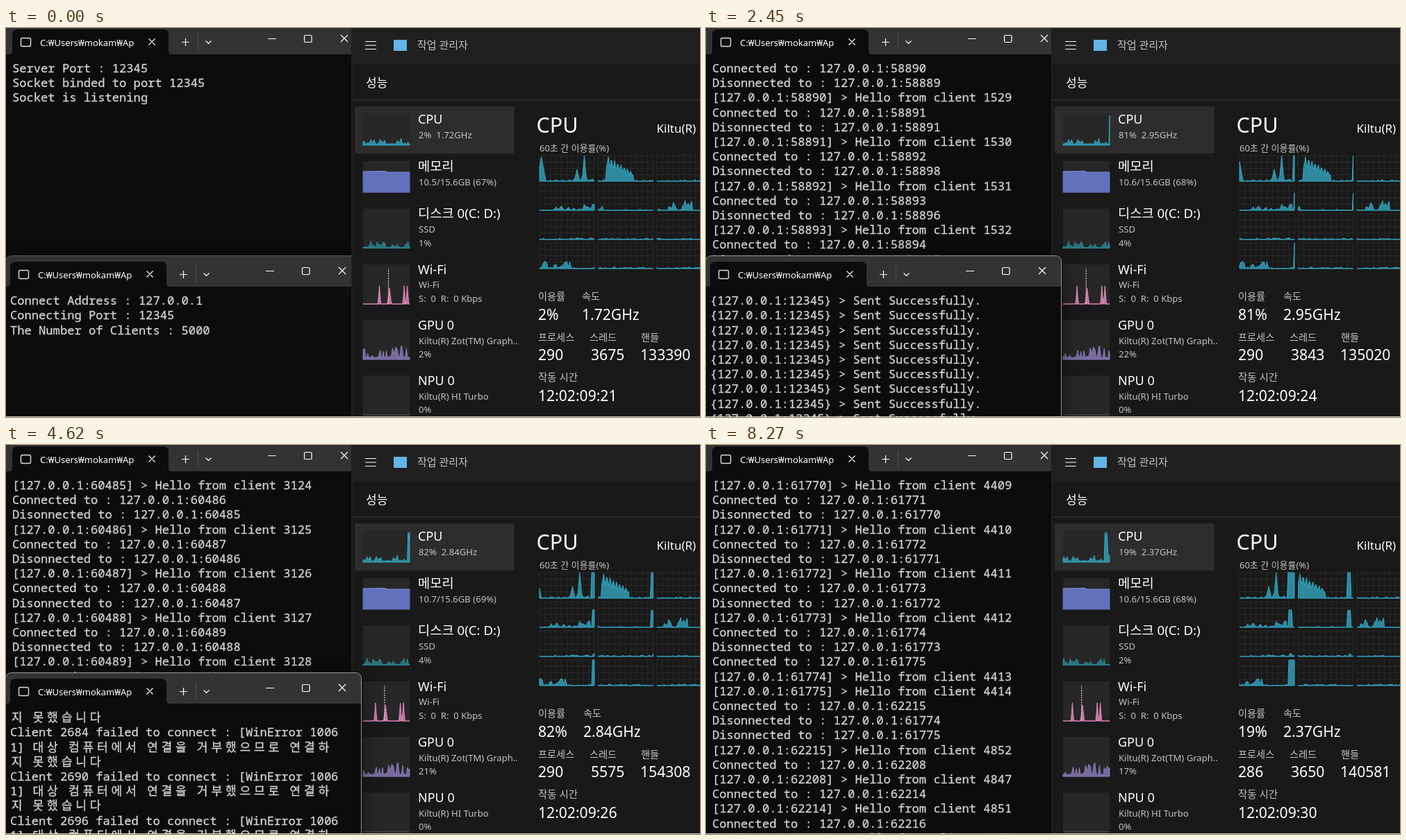
An HTML page that plays this animation: 999x561 px, repeating every 8300 ms.

```html
<!DOCTYPE html>
<html lang="ko">
<head>
<meta charset="utf-8">
<title>Socket load test</title>
<style>
html, body { margin: 0; width: 100%; height: 100%; overflow: hidden; background: #0c0c0c; }
svg { display: block; width: 100%; height: 100%; }
text { font-family: "Noto Sans", "Noto Sans CJK KR", sans-serif; fill: #fff; white-space: pre; }
.mono { font: 17.1px "Noto Sans Mono", "Noto Sans Mono CJK KR", "Noto Sans CJK KR", monospace; fill: #d4d4d4; stroke: #d4d4d4; stroke-width: .3; }
.line { fill: none; stroke: #fff; stroke-width: 1.2; }
.dim { fill: #c4c4c4; }
.thin { font-weight: 300; }
</style>
</head>
<body>
<svg id="stage" viewBox="0 0 999 561"></svg>
<script>
const LOOP = 8300, START = 1140, END = 5340, TICK = 36;
const CELL = 10.27, ROW = 21.2, HOST = '127.0.0.1';
const stage = document.getElementById('stage');

function add(parent, tag, attrs, text) {
  const node = document.createElementNS('http://www.w3.org/2000/svg', tag);
  for (const key in attrs) node.setAttribute(key, attrs[key]);
  if (text) node.textContent = text;
  parent.appendChild(node);
  return node;
}
const rect = (parent, x, y, width, height, fill, more) =>
  add(parent, 'rect', { x, y, width, height, fill, ...more });
const label = (x, y, size, text, more) =>
  add(stage, 'text', { x, y, 'font-size': size, ...more }, text);
const clamp = v => Math.max(0, Math.min(1, v));
const rand = (a, b) => { const v = Math.sin(a * 12.9898 + b * 78.233) * 43758.5453; return v - Math.floor(v); };

// Linear interpolation through [time, value] key points.
function track(t, ...keys) {
  let i = 1;
  while (i < keys.length - 1 && t > keys[i][0]) i++;
  const [t0, a] = keys[i - 1], [t1, b] = keys[i];
  return a + (b - a) * clamp((t - t0) / (t1 - t0));
}

// ---- terminals ----
const clips = add(stage, 'defs', {});
rect(add(clips, 'clipPath', { id: 'tabClip' }), 49, 0, 140, 40, '#000');

function chrome(parent, dx, dy) {
  const g = add(parent, 'g', { transform: `translate(${dx} ${dy})` });
  add(g, 'path', { d: 'M5 38Q9 38 9 33V10Q9 2 17 2H226Q234 2 234 10V33Q234 38 238 38Z', fill: '#0c0c0c' });
  rect(g, 21.5, 14.5, 14, 12, '#0c0c0c', { rx: 2, stroke: '#ddd', 'stroke-width': 1.4 });
  add(g, 'text', { x: 49, y: 25.5, 'font-size': 13, 'font-weight': 500, 'clip-path': 'url(#tabClip)' }, 'C:₩Users₩mokam₩Ap');
  add(g, 'path', { class: 'line', d: 'M205.5 15.5l9 9m0-9l-9 9M253 20.5h11m-5.5-5.5v11M287.5 18.5l4 4 4-4' });
  add(g, 'path', { class: 'line', d: 'M276.5 8v24', style: 'stroke:#4c4c4c' });
  add(g, 'path', { class: 'line', d: 'M377 15.5h12M482 10l10 10m0-10l-10 10' });
  rect(g, 429.5, 10.5, 10.5, 10, 'none', { class: 'line', rx: 1.5 });
}

const wide = ch => ch.charCodeAt(0) > 0x1100 ? 2 : 1;

function screen(parent, x, y, count) {
  const rows = Array.from({ length: count }, (_, i) =>
    add(parent, 'text', { class: 'mono', y: y + i * ROW }));
  return lines => rows.forEach((row, i) => {
    const s = lines[i] || '';
    if (row.textContent === s) return;
    let col = 0;
    row.setAttribute('x', [...s].map(ch => {
      const at = x + col * CELL + (wide(ch) - 1) * 1.8;
      col += wide(ch);
      return at.toFixed(1);
    }).join(' '));
    row.textContent = s;
  });
}

const opened = port => `Connected to : ${HOST}:${port}`;
const closed = port => `Disonnected to : ${HOST}:${port}`;
const hello = (port, id = port - (port < 58500 ? 57352 : 57361)) =>
  `[${HOST}:${port}] > Hello from client ${id}`;

const serverIntro = ['Server Port : 12345', 'Socket binded to port 12345', 'Socket is listening'];
const clientIntro = [`Connect Address : ${HOST}`, 'Connecting Port : 12345', 'The Number of Clients : 5000'];
const sent = `{${HOST}:12345} > Sent Successfully.`;

// Log lines for consecutive ports; `order` turns a port into its lines.
function feed(port, count, order) {
  const out = [];
  while (out.length < count) out.push(...order(port++));
  return out;
}
const alternating = port => port % 2
  ? [opened(port), closed(port - 1), hello(port)]
  : [opened(port), hello(port), closed(port - 1)];
const jumbled = port => [opened(port), closed(port - 2 + Math.floor(rand(port, 2) * 10)), hello(port)];
const pairs = port => [opened(port), hello(port)];
const steady = port => [opened(port), closed(port - 1), hello(port)];

const lastLog = [
  ...feed(61770, 12, steady).slice(2), opened(61774), closed(61773), opened(61775),
  hello(61774), hello(61775), opened(62215), closed(61774), closed(61775), hello(62215, 4852),
  opened(62208), hello(62208), opened(62214), hello(62214, 4851), opened(62216), hello(62216, 4853)
];

function serverLines(t, tick) {
  if (t < START) return serverIntro;
  if (t >= END) return lastLog;
  if (tick < 1) return [...serverIntro, ...feed(57353, 12, alternating)];
  if (t < 3840) {
    const port = Math.round(track(t, [START, 57352], [1464, 57928], [2436, 58890], [3804, 61926]));
    if (t > 2900) return feed(port, 25, pairs).slice(tick % 2);
    return feed(port, 25, t < 2200 ? alternating : jumbled).slice(tick % 3);
  }
  const port = Math.round(track(t, [3840, 59100], [4596, 60485], [END, 61770]));
  return feed(port, 25, steady).slice((tick + 2) % 3);
}

function wrap(text) {
  const lines = [''];
  let used = 0;
  for (const ch of text) {
    if (used + wide(ch) > 46) { lines.push(''); used = 0; }
    lines[lines.length - 1] += ch;
    used += wide(ch);
  }
  return lines;
}
const refused = id =>
  wrap(`Client ${id} failed to connect : [WinError 10061] 대상 컴퓨터에서 연결을 거부했으므로 연결하지 못했습니다`);

function clientLines(t, tick) {
  if (t < START) return clientIntro;
  if (t < 2850) return [...(tick < 1 ? clientIntro : []), ...Array(9).fill(sent)];
  const id = Math.round(track(t, [2850, 60], [3804, 1224], [4596, 2678], [END, 4150]));
  return [0, 1, 2, 3].flatMap(i => refused(id + i * 6)).slice((2 * tick + 2) % 3);
}

rect(stage, 0, 0, 999, 561, '#0c0c0c');
rect(stage, 0, 0, 498, 38, '#333');
chrome(stage, 0, 0);
const showServer = screen(stage, 9, 64, 25);

// ---- task manager ----
rect(stage, 497, 0, 502, 561, '#202020');
add(stage, 'path', { d: 'M499 561V58Q499 52 505 52H999V561Z', fill: '#191919' });
rect(stage, 499, 103, 500, 1.5, '#2e2e2e');
rect(stage, 502, 113, 230, 68, '#2d2d2d', { rx: 3 });
add(stage, 'path', { class: 'line', d: 'M517 19.5h16m-16 5.5h16m-16 5.5h16' });
rect(stage, 558, 17, 19, 16, '#62b5e5');
label(592, 30, 15, '작업 관리자', { class: 'dim' });
label(518, 85, 17, '성능', { 'font-weight': 500 });

// Usage in percent, n refreshes into the run.
const usage = n => Math.round(track(n, [0, 2], [1, 4], [2, 23], [3, 81], [4, 63], [5, 82], [6, 74], [7, 21], [9, 19]));

// A level is a function of the sample number; 0 is the newest sample at the start.
const ripple = (seed, top, from = -60, to = 60) => i => {
  if (i < from || i > to) return 0;
  const k = Math.floor(i / 2), mid = (rand(k, seed) + rand(Math.ceil(i / 2), seed)) / 2;
  return top * mid * mid;
};
const spike = (at, top, half = 2) => i => top * (1 - Math.abs(i - at) / half);
const busy = (from, to, top) => i => i >= from && i <= to ? top : 0;
const burst = (from, to) => i => i < from || i > to ? 0
  : (1 - 0.65 * (i - from) / (to - from)) * (0.78 + 0.22 * Math.cos(1.8 * (i - from - 2)));

function chart(x, y, w, h, color, ...levels) {
  const path = add(stage, 'path', { fill: color, 'fill-opacity': 0.75, stroke: color, 'stroke-width': 0.9 });
  return shift => {
    let d = `M${x} ${y + h}`;
    for (let k = 0; k <= 60; k++) {
      const level = clamp(Math.max(...levels.map(f => f(shift - 60 + k))));
      d += `L${(x + k * w / 60).toFixed(1)} ${(y + h - h * level).toFixed(1)}`;
    }
    path.setAttribute('d', d + `V${y + h}Z`);
  };
}

const cyan = '#35aecb', teal = '#2c8c9b', pink = '#ee8fc6', violet = '#9180c4';
rect(stage, 514, 123, 67, 46, '#272727');
rect(stage, 514, 192, 67, 45, '#272727');
for (let i = 0; i < 4; i++) rect(stage, 514, 260.5 + i * 80.3, 67, 57.5, '#272727');
add(stage, 'path', { d: 'M513.5 207L545 206.5L548 208H581.5V237.5H513.5Z', fill: '#6171bb' });
add(stage, 'path', { class: 'line', d: 'M514 207L545 206.500L548 208H581', style: 'stroke:#8090dc' });
rect(stage, 514, 557.5, 67, 1, '#555');

const charts = [
  chart(514, 123, 67, 46, cyan, ripple(3, 0.18), spike(-11, 0.22), () => 0.04,
    i => i > 2 ? Math.min(0.97, usage(i) / 100 * 1.15) : 0),
  chart(514, 260, 67, 57.5, teal, ripple(8, 0.17), spike(-50, 0.18), () => 0.02),
  chart(514, 341, 67, 57, pink, ...[-39, -7, -3].map(at => spike(at, 0.46, 1.7)), spike(-26, 0.4, 2.5)),
  chart(514, 421, 67, 57, violet, ripple(5, 0.36), spike(-11, 0.33), () => 0.05, i => i > 1 ? 0.17 + 0.1 * rand(i, 4) : 0)
];
const dotted = add(stage, 'path', { class: 'line', 'stroke-dasharray': '2 1.5', style: 'stroke:#ffc4e4' });

const cores = {
  0: [spike(-58, 0.95, 5), spike(-19, 0.46, 3), spike(-11, 1, 2.5), ripple(2, 0.2, -24, 0), busy(2, 9, 1)],
  1: [burst(-51, -22), busy(3, 6, 1)],
  3: [ripple(6, 0.25, -45, 0), spike(-11, 0.24), busy(3, 6, 0.68)],
  4: [spike(-56, 0.17), busy(3, 6, 0.66)],
  5: [ripple(9, 0.4, -47, -22), spike(-29, 0.38)],
  6: [busy(4, 6, 0.11)],
  7: [busy(5, 6, 0.11)],
  9: [ripple(11, 0.4, -58, -25), spike(-27, 0.26), busy(3, 9, 1)]
};
for (let n = 0; n < 12; n++) {
  const x = 768 + n % 3 * 84.5, y = 184 + Math.floor(n / 3) * 42, w = 79, h = 37;
  let d = `M${x} ${y}h${w}v${h}h${-w}Z`;
  for (let k = 1; k < 10; k++) d += `M${x + k * w / 10} ${y}v${h}`;
  for (let k = 1; k < 4; k++) d += `M${x} ${y + k * h / 4}h${w}`;
  add(stage, 'path', { class: 'line', d, style: 'stroke:#2a2a2a;stroke-width:1' });
  charts.push(chart(x, y, w, h, cyan, ripple(n + 20, 0.06), ...(cores[n] || [])));
}

['CPU', '메모리', '디스크 0(C: D:)', 'Wi-Fi', 'GPU 0', 'NPU 0'].forEach((text, i) =>
  label(593, i < 3 ? 138 + i * 68.2 : 355 + (i - 3) * 80.2, /[가-힣]/.test(text) ? 18.7 : 18, text));
const note = (y, text) => label(594, y, 13.1, text, { class: 'dim' });
const cpuNote = note(159), memNote = note(227);
note(295, 'SSD');
const diskNote = note(314.5);
note(375, 'Wi-Fi');
note(395, 'S:\u00a0 0\u00a0 R:\u00a0 0 Kbps');
note(456, 'Kiltu(R) Zot(TM) Graph..');
const gpuNote = note(475);
note(536, 'Kiltu(R) HI Turbo');
note(555, '0%');

label(763.5, 150.5, 30.5, 'CPU', { class: 'thin' });
label(936.5, 151, 17, 'Kiltu(R)');
const dim = (x, y, size, text) => label(x, y, size, text, { class: 'dim' });
dim(768, 178, 13, '60초 간 이용률(%)');
dim(766, 392, 14.2, '이용률');
const speedLabel = dim(829, 392, 14.2, '속도');
['프로세스', '스레드', '핸들'].forEach((text, i) => dim(766 + i * 74, 451, 14.2, text));
dim(766, 509, 14.5, '작동 시간');
const value = (x, y) => label(x, y, 21.1, '', { class: 'thin' });
const useValue = value(766, 420.5), speedValue = value(829, 420.5);
const processes = value(766, 479), threads = value(842, 479), handles = value(913, 479);
const uptime = value(766, 537.5);

let shown = -1;
function showStats(n) {
  if (n === shown) return;
  shown = n;
  const use = usage(n);
  const speed = track(n, [0, 1.72], [2, 2.19], [3, 2.95], [4, 2.8], [5, 2.84], [7, 2.53], [9, 2.37]).toFixed(2) + 'GHz';
  const extra = (n > 1) + (n > 3 && n < 7);
  cpuNote.textContent = `${use}%\u00a0 ${speed}`;
  memNote.textContent = `10.${5 + extra}/15.6GB (${67 + extra}%)`;
  diskNote.textContent = Math.round(track(n, [2, 1], [3, 4], [4, 5], [9, 2])) + '%';
  gpuNote.textContent = Math.round(n < 2 ? 2 + n : track(n, [2, 21], [4, 23], [7, 17])) + '%';
  useValue.textContent = use + '%';
  speedValue.textContent = speed;
  for (const node of [speedLabel, speedValue]) node.setAttribute('x', use > 9 ? 831 : 829);
  processes.textContent = n < 7 ? 290 : 286;
  threads.textContent = Math.round(track(n, [0, 3675], [2, 3668], [3, 3843], [4, 5271], [5, 5575], [7, 3651], [9, 3650]));
  handles.textContent = Math.round(track(n, [0, 133390], [2, 133422], [3, 135020], [4, 144826], [5, 154308], [7, 140555], [9, 140581]));
  uptime.textContent = '12:02:09:' + (21 + n);
  charts.forEach(draw => draw(n));
  dotted.setAttribute('d', `M${550.5 - n * 1.1} 397V347`);
}

// ---- client window, in front once it has focus ----
const front = rect(add(clips, 'clipPath', { id: 'frontClip' }), 0, 300, 497, 261, '#000');
const holder = add(stage, 'g', { 'clip-path': 'url(#frontClip)' });
const client = add(holder, 'g', {});
rect(client, -0.5, 328.5, 512, 300, '#0c0c0c', { rx: 8, style: 'filter:drop-shadow(0 6px 14px rgba(0,0,0,.45))' });
add(client, 'path', { d: 'M0 373V337Q0 329 8 329H503Q511 329 511 337V373Z', fill: '#333' });
chrome(client, -3, 335);
const edge = rect(client, -0.5, 328.5, 512, 300, 'none', { rx: 8 });
const showClient = screen(client, 6, 399.2, 9);
const caret = rect(client, 294, 425, 1, 21, '#fff');
rect(stage, 0, 560, 999, 1, '#fff', { opacity: 0.75 });

function update(t) {
  const tick = Math.floor((t - START) / TICK);
  const at = t < START ? t : Math.min(END, START + tick * TICK);
  const last = Math.floor((END - START) / TICK);
  showServer(serverLines(at, tick));
  showClient(clientLines(at, Math.min(tick, last)));
  showStats(t < 260 ? 0 : 1 + Math.floor((t - 240) / 998));

  const focused = t >= 290;
  front.setAttribute('width', focused ? 700 : 497);
  edge.setAttribute('stroke', focused ? '#9a9a9a' : '#5a5a5a');
  caret.setAttribute('visibility', t >= 330 && t < 810 ? 'visible' : 'hidden');

  const gone = clamp((t - 5390) / 160);
  client.setAttribute('transform', `translate(255 500) scale(${1 - 0.08 * gone}) translate(-255 -500)`);
  client.setAttribute('opacity', 1 - gone);
  holder.setAttribute('visibility', gone < 1 ? 'visible' : 'hidden');
}

const begun = performance.now();
function play(now) {
  update(Math.max(0, now - begun) % LOOP);
  requestAnimationFrame(play);
}
update(0);
requestAnimationFrame(play);
</script>
</body>
</html>
```
